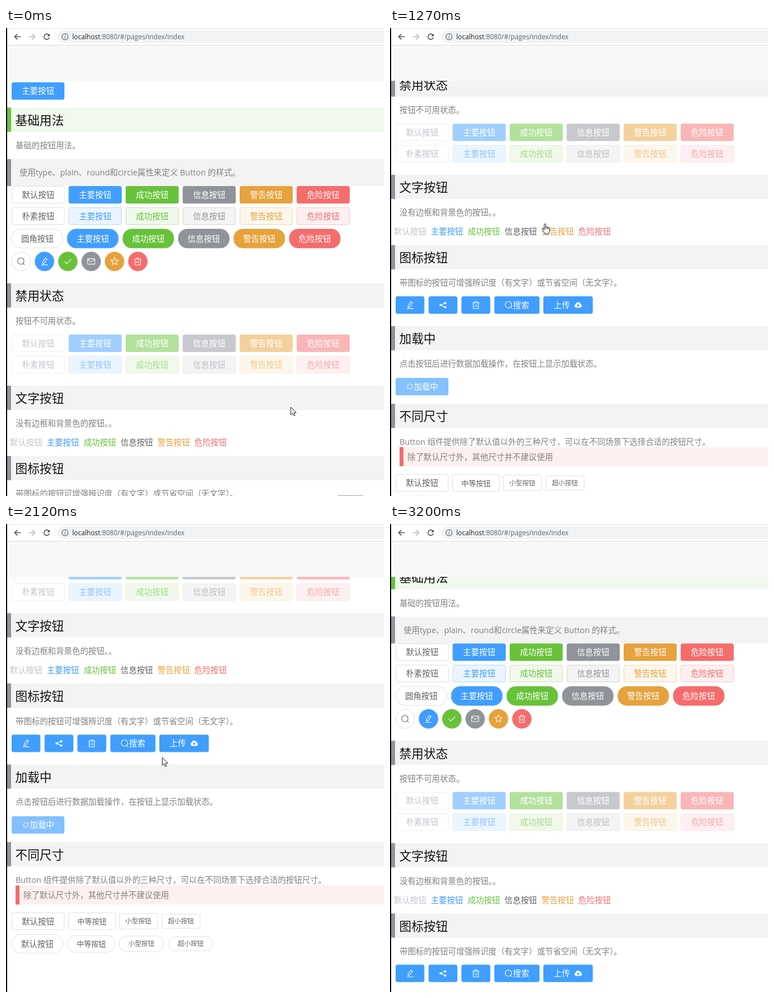
These frames come from a looping animation (673 by 832 pixels, 3900 ms). An HTML page with a canvas:

```html
<!DOCTYPE html>
<html lang="zh-CN">
<head>
<meta charset="utf-8">
<style>
html, body { margin: 0; width: 100%; height: 100%; overflow: hidden; background: #fff; }
canvas { display: block; }
</style>
</head>
<body>
<canvas id="stage" width="673" height="832"></canvas>
<script>
const ctx = document.getElementById('stage').getContext('2d');
const W = 673, H = 832, LOOP = 3900, TOP = 94;
const FONT = '"Open Sans", "Noto Sans CJK SC", "Noto Sans CJK", sans-serif';
const BLUE = '#409eff', GREEN = '#67c23a', GRAY = '#909399', RED = '#f56c6c';
const INK = '#606266', PALE = '#c0c4cc', NOTE = '#808080';
const TYPES = ['', BLUE, GREEN, GRAY, '#e6a23c', RED];
const NAMES = ['默认', '主要', '成功', '信息', '警告', '危险'].map(s => s + '按钮');
const PLAIN = ['朴素按钮', ...NAMES.slice(1)];
const ROUND = ['圆角按钮', ...NAMES.slice(1)];

// ---- timing ----
const ANCHORS = [0, 70, 570, 650, 740, 800, 1110, 1190, 1570, 1660, 1750,
  1810, 1890, 2200, 2280, 2350, 2740, 2810, 3200];
const ticks = [0];
ANCHORS.slice(1).forEach((end, i) => {
  const start = ANCHORS[i], n = Math.max(1, Math.round((end - start) / 75));
  for (let k = 1; k <= n; k++) ticks.push(start + (end - start) * k / n);
});

// wheel bursts: down, a last notch to the page end, then back up
const SCROLL = [[1000, 0], [1110, 167.4], [1190, 290], [1266, 375], [1342, 408.4],
  [1550, 408.4], [1570, 412.6], [1660, 455], [1750, 477.5],
  [2200, 477.5], [2280, 226.4], [2350, 130], [2428, 85], [2506, 68.6]];
const POINTER = [[40, 507, 674], [540, 62, 114], [740, 62, 114], [955, 276.5, 345],
  [1110, 276.5, 345], [1570, 274.5, 355], [1660, 274.5, 355], [1750, 279, 402],
  [1890, 279, 402], [2122, 278, 420], [2740, 278, 420], [3160, 490, 797]];

const linear = u => u;
const smooth = u => u * u * (3 - 2 * u);

function track(keys, t, ease) {
  if (t <= keys[0][0]) return keys[0].slice(1);
  for (let i = 1; i < keys.length; i++) {
    const a = keys[i - 1], b = keys[i];
    if (t <= b[0]) {
      const u = ease((t - a[0]) / (b[0] - a[0]));
      return a.slice(1).map((v, k) => v + (b[k + 1] - v) * u);
    }
  }
  return keys[keys.length - 1].slice(1);
}
const within = (t, a, b) => t >= a && t < b;
const overMain = t => within(t, 500, 650);
const overRound = t => within(t, 940, 1340);
const overUpload = t => within(t, 1750, 1968);

// ---- drawing helpers ----
function mix(hex, k) {
  const n = parseInt(hex.slice(1), 16);
  const part = s => Math.round(255 + ((n >> s & 255) - 255) * k);
  return `rgb(${part(16)},${part(8)},${part(0)})`;
}

function rect(x, y, w, h, color) {
  ctx.fillStyle = color;
  ctx.fillRect(x, y, w, h);
}

// Latin runs are set at regular weight, Chinese runs light
function text(s, x, cy, size, color, align = 'left') {
  ctx.fontKerning = 'none';
  ctx.textAlign = align;
  ctx.fillStyle = color;
  for (const run of s.match(/[ -~]+|[^ -~]+/g)) {
    ctx.font = `${run < '\x7f' ? 400 : 300} ${size}px ${FONT}`;
    ctx.fillText(run, x, cy + size * 0.37);
    x += ctx.measureText(run).width;
  }
}

function box(x, y, w, h, r, fill, border) {
  ctx.beginPath();
  ctx.roundRect(x + .5, y + .5, w - 1, h - 1, r);
  ctx.fillStyle = fill;
  ctx.fill();
  ctx.strokeStyle = border || fill;
  ctx.lineWidth = 1;
  ctx.stroke();
}

function button(x, y, w, h, r, label, style, size = 14.4) {
  box(x, y, w, h, r, style.fill, style.border);
  text(label, x + w / 2, y + h / 2, size, style.ink, 'center');
}

const solid = (c, k = 1) => c
  ? { fill: mix(c, k), ink: '#fff' }
  : { fill: '#fff', border: k < 1 ? '#ebeef5' : '#dcdfe6', ink: k < 1 ? PALE : INK };
const plain = (c, off) => c
  ? { fill: mix(c, .1), border: mix(c, off ? .2 : .4), ink: off ? mix(c, .6) : c }
  : solid('', off ? .5 : 1);

function row(y, labels, styleOf) {
  labels.forEach((s, i) => button(10 + i * 101.5, y, 94.5, 31, 2.5, s, styleOf(TYPES[i])));
}

function heading(y, title, bar = GRAY, fill = '#f3f3f4') {
  rect(2, y, W, 43, fill);
  rect(2, y, 7, 43, bar);
  text(title, 16.6, y + 22.5, 21.6, '#111');
}

// ---- icons, 16 unit box around the centre ----
const star = Array.from({ length: 10 }, (_, i) => {
  const a = i * Math.PI / 5 - Math.PI / 2, r = i % 2 ? 3.6 : 7.6;
  return (i ? 'L' : 'M') + (r * Math.cos(a)).toFixed(2) + ' ' + (r * Math.sin(a)).toFixed(2);
}).join('') + 'Z';
const ICONS = {
  search: 'M-7 -.6a6.3 6.3 0 1 0 12.6 0a6.3 6.3 0 1 0 -12.6 0M4 4L6.6 6.8',
  edit: 'M-3.8 4.6L-3.9 1L1.6 -6.6L5 -4.2L-.6 3.3ZM-6.2 6.8H6.4',
  check: 'M-6.4 .2L-2.2 4.4L6.6 -4.4',
  mail: 'M-6.2 -5.4H6.2Q7 -5.4 7 -4.6V4.6Q7 5.4 6.2 5.4H-6.2Q-7 5.4 -7 4.6V-4.6Q-7 -5.4 -6.2 -5.4ZM-6.6 -4L0 1.2L6.6 -4',
  star,
  trash: 'M-7 -4.4H7M-5.2 -4.4V7H5.2V-4.4M-2.4 -4.4V-7H2.4V-4.4M-1.8 -1.2V4M1.8 -1.2V4',
  share: 'M4.5 -4L-4.5 0L4.5 4.4',
  back: 'M6 0H-5.6M0 -5.6L-5.6 0L0 5.6',
  forward: 'M-6 0H5.6M0 -5.6L5.6 0L0 5.6',
  reload: 'M4.4 -3.2A5.4 5.4 0 1 0 5.2 1.6',
  info: 'M-6 0a6 6 0 1 0 12 0a6 6 0 1 0 -12 0M0 -.8V3.2M0 -3.2V-1.9'
};
for (const k in ICONS) ICONS[k] = new Path2D(ICONS[k]);
const CLOUD = new Path2D('M-4 5.2A3.7 3.7 0 0 1 -4.8 -1.9A5 5 0 0 1 4.8 -2A3.7 3.7 0 0 1 4 5.2Z');
const LIFT = new Path2D('M0 -2L3 1.2H.9V4H-.9V1.2H-3Z');
const ARROW = new Path2D('M0 0V13.6L3.2 10.7L5.4 15.6L7.6 14.6L5.5 9.9H9.8Z');
const HAND = new Path2D('M-1.3 1.2Q0 -.6 1.3 1.2V6.2Q2.7 5.2 3.9 6.6Q5.2 5.8 6.3 7.2Q8.3 6.8 8.4 8.8V12.4Q8.2 14.6 6.9 16V18.6H-.3V17Q-2.7 14.6 -4.6 11.2Q-5.4 9 -3.6 9.2Q-2.4 9.6 -1.3 11.2Z');

function at(x, y, scale, draw) {
  ctx.save();
  ctx.translate(x, y);
  ctx.scale(scale, scale);
  draw();
  ctx.restore();
}

function icon(name, x, y, color, line = 1.2, scale = .9) {
  at(x, y, scale, () => {
    ctx.strokeStyle = ctx.fillStyle = color;
    ctx.lineWidth = line;
    ctx.stroke(ICONS[name]);
    if (name === 'share') [[-4.5, 0], [4.5, -4], [4.5, 4.4]].forEach(([a, b]) => disc(a, b, 2.3, color));
    if (name === 'reload') ctx.fill(new Path2D('M6 -6V-.8H.8Z'));
  });
}

function disc(x, y, r, fill, border) {
  ctx.beginPath();
  ctx.arc(x, y, r, 0, 7);
  ctx.fillStyle = fill;
  ctx.fill();
  if (border) {
    ctx.strokeStyle = border;
    ctx.lineWidth = 1;
    ctx.stroke();
  }
}

function spinner(x, y, t) {
  at(x, y, 1, () => {
    ctx.rotate(t / 2000 * Math.PI * 2);
    ctx.strokeStyle = '#fff';
    ctx.lineWidth = 1.1;
    ctx.beginPath();
    for (let i = 0; i < 8; i++) {
      ctx.rotate(Math.PI / 4);
      ctx.moveTo(0, 3);
      ctx.lineTo(0, 6.3);
    }
    ctx.stroke();
  });
}

// ---- page ----
function basics(t) {
  if (t < 650) {
    button(10, 96.5, 94, 31, 2.5, NAMES[1], solid(BLUE, overMain(t) ? .8 : 1));
  } else {
    box(10, 96.5, 109, 31, 2.5, '#85b9f3');
    spinner(35.5, 112, t);
    text(NAMES[1], 43, 112, 14.4, '#fff');
  }
  heading(141.5, '基础用法', GREEN, '#f0f9eb');
  text('基础的按钮用法。', 17, 209, 14.4, NOTE);
  rect(2, 233, W, 48, '#f3f3f4');
  rect(2, 233, 7, 48, GRAY);
  text('使用type、plain、round和circle属性来定义 Button 的样式。', 24, 257, 14.4, NOTE);
  row(281, NAMES, c => solid(c));
  row(319, PLAIN, c => plain(c));
  ROUND.forEach((s, i) => {
    const k = i === 2 && overRound(t) ? .8 : 1;
    button(10 + i * 98.8, 357, 91.5, 34.5, 15.5, s, solid(TYPES[i], k));
  });
  ['search', 'edit', 'check', 'mail', 'star', 'trash'].forEach((name, i) => {
    const x = 27 + i * 41.55, c = TYPES[i];
    disc(x, 415, 16.8, c || '#fff', c || '#dcdfe6');
    icon(name, x, 415, c ? '#fff' : INK);
  });
}

function disabled() {
  heading(454, '禁用状态');
  text('按钮不可用状态。', 17, 521, 14.4, NOTE);
  row(545, NAMES, c => solid(c, .5));
  row(583, PLAIN, c => plain(c, true));
}

function links() {
  heading(636, '文字按钮');
  text('没有边框和背景色的按钮。。', 17, 703, 14.4, NOTE);
  const inks = [PALE, BLUE, GREEN, INK, TYPES[4], RED];
  NAMES.forEach((s, i) => text(s, 7 + i * 65.7, 737, 14.4, inks[i]));
}

function iconButtons(t) {
  heading(761, '图标按钮');
  text('带图标的按钮可增强辨识度（有文字）或节省空间（无文字）。', 17, 828, 14.4, NOTE);
  ['edit', 'share', 'trash'].forEach((name, i) => {
    box(10 + i * 58.6, 852, 51.3, 31, 2.5, BLUE);
    icon(name, 35.7 + i * 58.6, 867.5, '#fff');
  });
  box(185.7, 852, 80.5, 31, 2.5, BLUE);
  icon('search', 211.5, 867.5, '#fff');
  text('搜索', 219, 867.5, 14.4, '#fff');
  const fill = mix(BLUE, overUpload(t) ? .8 : 1);
  box(273, 852, 88, 31, 2.5, fill);
  text('上传', 291.5, 867.5, 14.4, '#fff');
  at(335, 867.5, .9, () => {
    ctx.fillStyle = '#fff';
    ctx.fill(CLOUD);
    ctx.fillStyle = fill;
    ctx.fill(LIFT);
  });
}

function loading(t) {
  heading(905, '加载中');
  text('点击按钮后进行数据加载操作，在按钮上显示加载状态。', 17, 971.5, 14.4, NOTE);
  box(10, 997, 94, 31, 2.5, mix(BLUE, .65));
  spinner(35.5, 1012.5, t);
  text('加载中', 42.5, 1012.5, 14.4, '#fff');
}

function sizes() {
  heading(1043, '不同尺寸');
  text('Button 组件提供除了默认值以外的三种尺寸，可以在不同场景下选择合适的按钮尺寸。', 17, 1110.5, 14.4, NOTE);
  rect(17, 1120, W, 34, '#fef0f0');
  rect(17, 1120, 7, 34, RED);
  text('除了默认尺寸外，其他尺寸并不建议使用', 31, 1137.5, 14.4, NOTE);
  // label, font size, square x/w/h, round x/w/h
  [
    ['默认按钮', 14.4, 10, 94, 31, 10, 91.5, 34.5],
    ['中等按钮', 13, 111, 84, 31, 108.7, 86, 31],
    ['小型按钮', 11.5, 201, 69, 28.5, 201, 80, 28.5],
    ['超小按钮', 11.5, 277, 69, 26, 288.7, 80, 26]
  ].forEach(([s, size, x, w, h, rx, rw, rh]) => {
    button(x, 1183.7 - h / 2, w, h, 2, s, solid(''), size);
    button(rx, 1223.7 - rh / 2, rw, rh, rh / 2 - 1.5, s, solid(''), size);
  });
}

function browser() {
  rect(0, 0, W, 31, '#fff');
  rect(0, 0, W, 1, '#dee1e6');
  ctx.beginPath();
  ctx.roundRect(91, 4, 640, 23, 11.5);
  ctx.fillStyle = '#f1f3f4';
  ctx.fill();
  rect(0, 30, W, 1, '#dcdee0');
  rect(0, 31, W, TOP - 31, '#f8f8f8');
  icon('back', 20.5, 15.5, '#4a4d51', 1.7);
  icon('forward', 46.5, 15.5, '#b4b6b9', 1.7);
  icon('reload', 72.5, 15.5, '#4a4d51', 1.7);
  icon('info', 105, 15.5, '#5f6368', 1.3);
  text('localhost', 118, 15.3, 11.95, '#202124');
  const x = 118 + ctx.measureText('localhost').width;
  text(':8080/#/pages/index/index', x, 15.3, 11.95, '#5f6368');
}

function pointer(t) {
  if (t >= 3199) return;
  const [x, y] = track(POINTER, t, smooth);
  const hand = overMain(t) || overRound(t) || overUpload(t);
  at(x, y, 1, () => {
    const shape = hand ? HAND : ARROW;
    ctx.fillStyle = '#fff';
    ctx.strokeStyle = '#15151f';
    ctx.lineWidth = 1;
    ctx.fill(shape);
    ctx.stroke(shape);
    if (hand) ctx.stroke(new Path2D('M1.3 6V9.5M3.9 6.6V9.7M6.3 7.2V10'));
  });
}

function draw(t) {
  rect(0, 0, W, H, '#fff');
  ctx.save();
  ctx.beginPath();
  ctx.rect(0, TOP, W, H - TOP);
  ctx.clip();
  ctx.translate(0, -track(SCROLL, t, linear)[0]);
  basics(t);
  disabled();
  links();
  iconButtons(t);
  loading(t);
  sizes();
  ctx.restore();
  browser();
  rect(0, 0, 2, H, '#000');
  if (t < 650) for (let x = 591; x < 635; x += 3) rect(x, 831, 2, 1, '#777');
  pointer(t);
}

const origin = performance.now();
function frame() {
  const now = (performance.now() - origin) % LOOP;
  let t = 0;
  for (const k of ticks) if (k <= now + .01) t = k;
  draw(t);
  requestAnimationFrame(frame);
}
frame();
</script>
</body>
</html>
```
